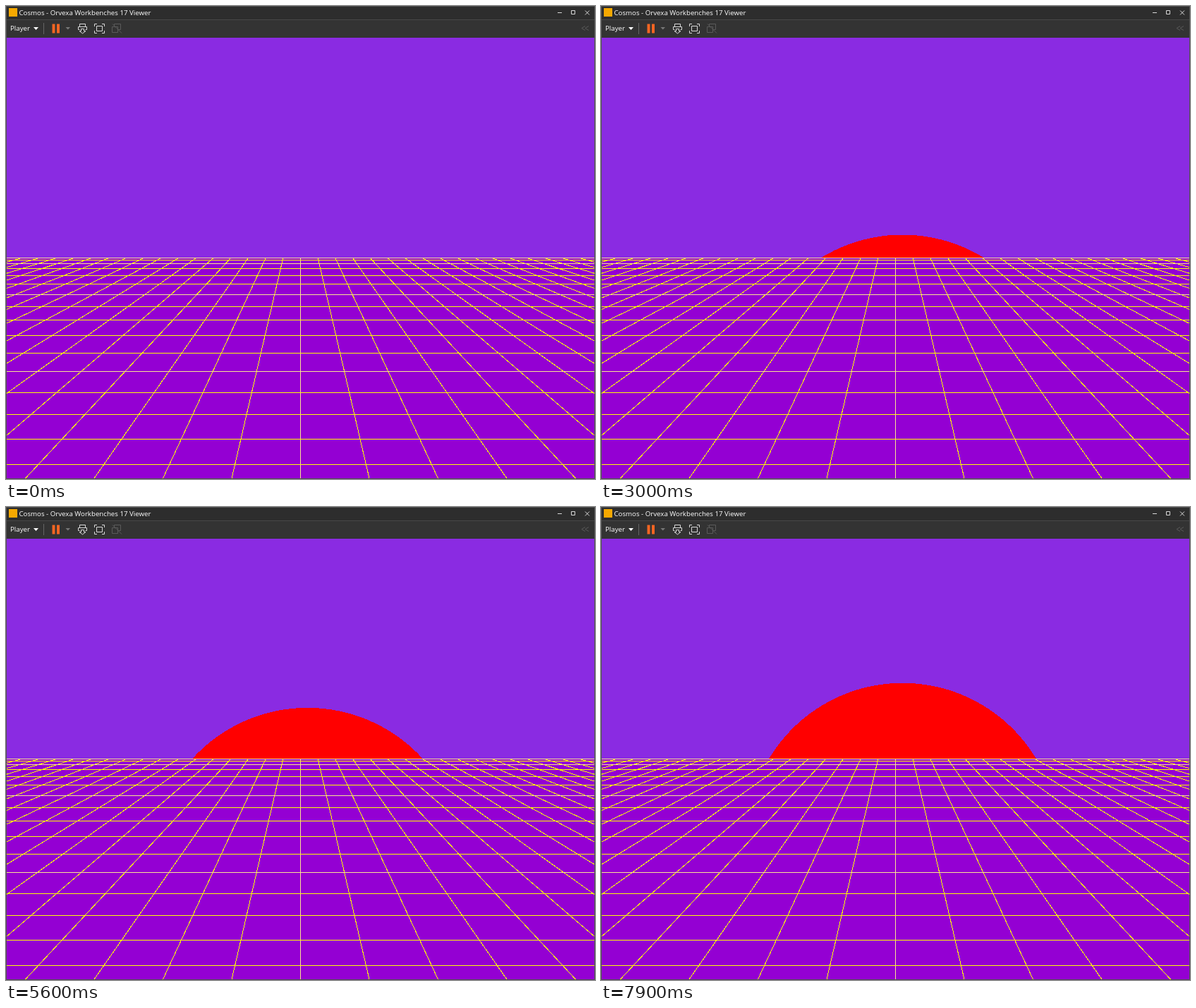
Animation, 835 px wide and 671 px high, one loop 8000 ms. Source, as an HTML page:

```html
<!DOCTYPE html>
<html lang="en">
<head>
<meta charset="utf-8">
<title>Sunrise</title>
<style>
  html, body { margin: 0; width: 100%; height: 100%; overflow: hidden; background: #333; }
  svg { display: block; width: 100%; height: 100%; }
  text { font: 9.7px "Open Sans", "Noto Sans", sans-serif; fill: #fff; }
  .line { fill: none; stroke: #d8d8d8; }
  .dim { stroke: #5a5a5a; }
</style>
</head>
<body>
<svg viewBox="0 0 835 671">
  <!-- title bar -->
  <rect width="835" height="45" fill="#333"/>
  <rect width="835" height="19" fill="#2d2d2d"/>
  <path class="line" style="stroke:#484848" d="M0 19.5H835"/>
  <rect x="4" y="3" width="12" height="12" fill="#f5a800"/>
  <text x="18.5" y="13">Cosmos - Orvexa Workbenches 17 Viewer</text>
  <path class="line" d="M782 9.5h6M801.5 6.5h5v5h-5zM821 6.5l6 6m0-6l-6 6"/>

  <!-- toolbar -->
  <text x="6" y="35">Player</text>
  <path fill="#fff" d="M39 30h7l-3.5 4z"/>
  <path fill="#777" d="M84.500 30h6.500l-3.250 3.500z"/>
  <path class="line" style="stroke:#666" d="M53.500 24V40"/>
  <path fill="#f26522" d="M65.500 25.500h4v13h-4zM72 25.500h4v13h-4z"/>
  <path class="line" d="M104.500 29.500v-4h8v4M104.500 33.500h-2v-4h12v4h-2M106.500 32.500h4v3h2.500l-4.500 3.500-4.500-3.500h2.500z"/>
  <path class="line" d="M125.500 29v-3.500h3.500M136 25.500h3.500v3.500M139.500 35v3.500h-3.500M129 38.500h-3.500v-3.500M128.500 28.500h8v7h-8z"/>
  <path class="line dim" d="M153.500 28.500v-3h9v8h-3M150.500 29.500h8v8h-8zM151 25.500l13 13"/>
  <path class="line dim" d="M821 28.500l-5 3 5 3M826 28.500l-5 3 5 3"/>

  <!-- scene -->
  <g shape-rendering="crispEdges">
    <rect y="45" width="835" height="626" fill="#8a2be2"/>
    <circle id="sun" cx="427.5" r="220.7" fill="#f00"/>
    <rect y="357" width="835" height="314" fill="#9400d3"/>
    <g id="grid"></g>
  </g>
  <rect class="line" style="stroke:#505050" x=".5" y=".5" width="834" height="670"/>
</svg>
<script>
const sun = document.getElementById('sun');
const grid = document.getElementById('grid');
const HORIZON = 357.5, CENTER = 417.5, STEP = 100, LOOP = 8000;

function addLine(x1, y1, x2, y2, pale) {
  const line = document.createElementNS('http://www.w3.org/2000/svg', 'path');
  line.setAttribute('d', `M${x1} ${y1}L${x2} ${y2}`);
  line.setAttribute('stroke', pale ? '#fbe591' : '#ff0');
  grid.append(line);
}

for (let i = -17; i <= 17; i++)
  addLine(CENTER + 24.7 * i, HORIZON, CENTER + 97.6 * i, 670.5, i === 0);

for (let k = 0; k < 16; k++) {
  const y = Math.floor(357.8 + 1.22 * k * (k + 1)) + 0.5;
  addLine(0, y, 835, y, [0, 2, 6, 11].includes(k));
}

function draw() {
  const t = performance.now() % LOOP;
  const step = Math.max(0, Math.floor(t / STEP) - 8);
  sun.setAttribute('cy', 358.1 - 1.527 * step + 220.7);
  requestAnimationFrame(draw);
}
draw();
</script>
</body>
</html>
```
